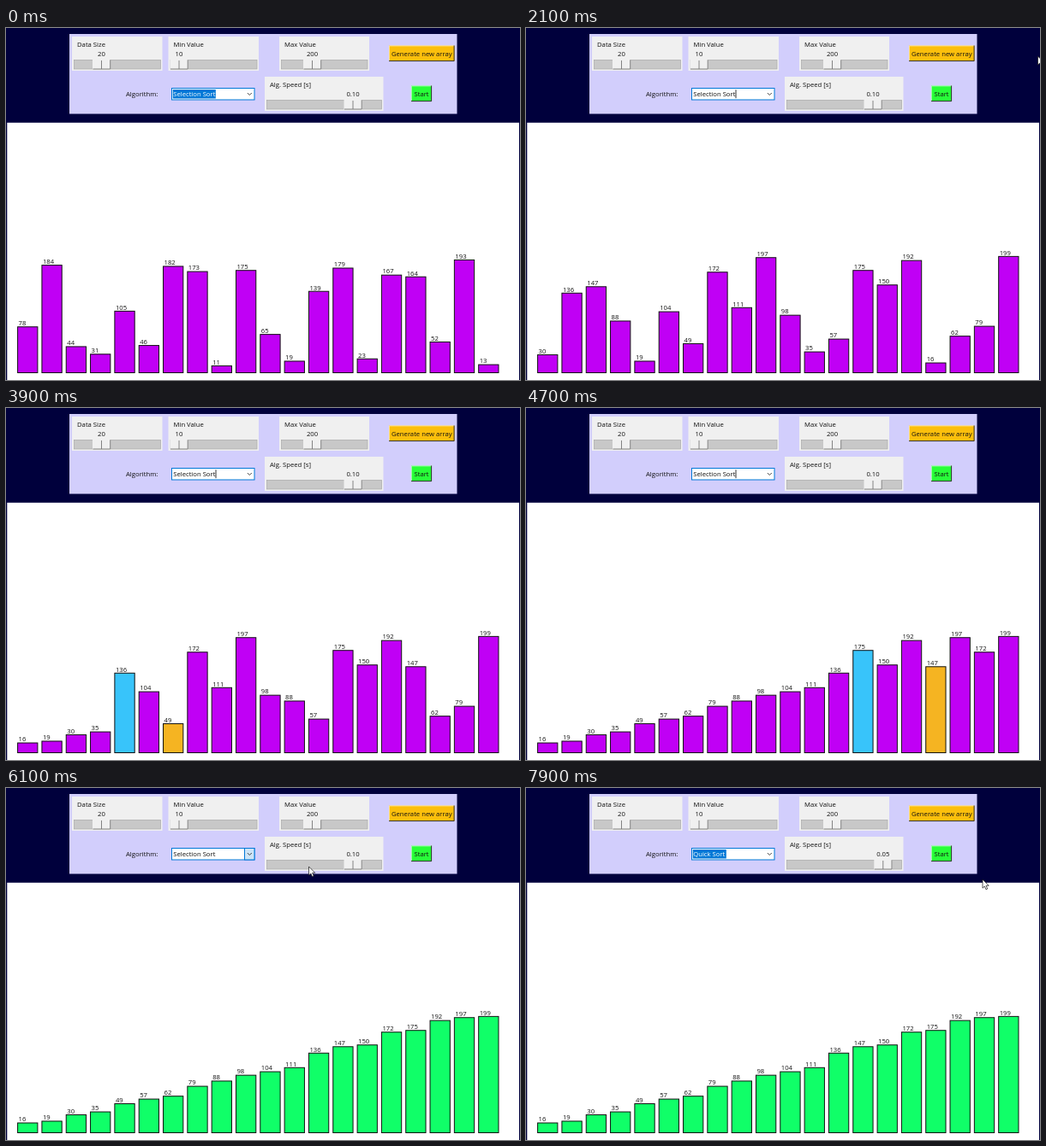
Recreate the animation shown at these times as an HTML page. Size 600 px wide and 412 px high, loop 8000 ms.

```html
<!DOCTYPE html>
<html lang="en">
<head>
<meta charset="utf-8">
<title>Sorting visualizer</title>
<style>
  html, body { margin: 0; width: 100%; height: 100%; overflow: hidden; background: #00003c; }
  svg { display: block; width: 600px; height: 412px; }
  text { font: 7.7px "Open Sans", "Noto Sans", sans-serif; fill: #111; white-space: pre; }
</style>
</head>
<body>
<svg id="stage" viewBox="0 0 600 412"></svg>
<script>
const LOOP = 8000;
const REGENERATE = 1680, SORT_START = 3500, STEP = 89;
const DESELECT = 650, PICK_QUICK = 7320;
const COLORS = { idle: '#c000f5', current: '#38c4fa', minimum: '#f5b422', done: '#10ff68' };
const BLUE = '#0078d7';

const firstData = [78, 184, 44, 31, 105, 46, 182, 173, 11, 175, 65, 19, 139, 179, 23, 167, 164, 52, 193, 13];
const secondData = [30, 136, 147, 88, 19, 104, 49, 172, 111, 197, 98, 35, 57, 175, 150, 192, 16, 62, 79, 199];

// Pointer waypoints [time, x, y]; each list is one visit to the stage.
const visits = [
  [[100, 286, 108], [500, 262, 76], [680, 262, 76], [920, 576, 44], [1130, 576, 42], [1300, 557, 37.5],
   [1520, 500, 30], [1740, 500, 30], [2100, 597.5, 33], [2200, 612, 34]],
  [[2950, 612, 60], [3380, 487, 77], [3520, 487, 77], [3680, 612, 66]],
  [[5500, 540, -16], [5880, 284, 77], [6000, 284, 77], [6100, 353.5, 92], [6300, 405, 90], [6450, 405, 90],
   [6650, 417, 90], [6980, 284, 77], [7120, 284, 77], [7260, 222, 100], [7350, 222, 100],
   [7850, 533, 107], [8000, 533, 107]]
];

const stage = document.getElementById('stage');

function add(tag, attrs, parent = stage) {
  const node = document.createElementNS('http://www.w3.org/2000/svg', tag);
  set(node, attrs);
  parent.appendChild(node);
  return node;
}
function set(node, attrs) {
  for (const key in attrs) node.setAttribute(key, attrs[key]);
}
const box = (x, y, width, height, fill, extra = {}, parent) =>
  add('rect', { x, y, width, height, fill, ...extra }, parent);
function label(x, y, words, anchor = 'start') {
  const node = add('text', { x, y, 'text-anchor': anchor });
  node.textContent = words;
  return node;
}
const show = (node, visible) => set(node, { visibility: visible ? 'visible' : 'hidden' });

function slider(x, y, width, title, value, thumbX) {
  box(x, y, width, 40, '#f0f0f0');
  label(x + 6, y + 11.5, title);
  box(x + 2.5, y + 27.5, width - 4.5, 10.5, '#c8c8c8', { stroke: '#a8a8a8', 'stroke-width': .7 });
  const thumb = add('g', {});
  box(-10.5, y + 27, 21, 11.5, '#f0f0f0', {}, thumb);
  add('path', { d: `M-10 ${y + 38}H10.2V${y + 27.3}M0 ${y + 28}v10`, fill: 'none', stroke: '#777', 'stroke-width': .9 }, thumb);
  const number = label(0, y + 23, value, 'middle');
  const move = (at, words) => {
    set(thumb, { transform: `translate(${at} 0)` });
    set(number, { x: at });
    number.textContent = words;
  };
  move(thumbX, value);
  return move;
}

function button(x, y, width, height, fill, words) {
  box(x, y, width, height, fill);
  add('path', { d: `M${x + .4} ${y + height}V${y + .4}H${x + width}`, fill: 'none', stroke: '#fff', 'stroke-opacity': .7, 'stroke-width': .8 });
  add('path', { d: `M${x} ${y + height - .4}H${x + width - .4}V${y}`, fill: 'none', stroke: '#333', 'stroke-width': 1 });
  label(x + width / 2, y + height / 2 + 2.8, words, 'middle');
}

box(0, 0, 600, 412, '#00003c');
box(74, 7, 452.5, 93.5, '#d2cefc');
slider(77, 10, 105.5, 'Data Size', '20', 111.5);
slider(189.5, 10, 105.5, 'Min Value', '10', 202);
slider(319, 10, 105, 'Max Value', '200', 357.5);
const setSpeed = slider(302, 57, 138.5, 'Alg. Speed [s]', '0.10', 405);
button(447, 20.5, 76.5, 18.5, '#fcbf0c', 'Generate new array');
button(473, 67.5, 24, 18.5, '#28ff38', 'Start');
label(140, 80, 'Algorithm:');

box(193.5, 70.5, 96.5, 13.5, '#fff', { stroke: BLUE, 'stroke-width': 1 });
const arrowHover = box(278.5, 70.5, 11.5, 13.5, '#cce4f7', { stroke: BLUE, 'stroke-width': 1 });
add('path', { d: 'M281.8 76l2.5 2.5 2.5-2.5', fill: 'none', stroke: '#333', 'stroke-width': .9 });
const highlight = box(194.8, 72, 50, 10.5, BLUE);
const choice = label(195.2, 80, 'Selection Sort');
const caret = box(244.6, 72.2, .8, 10, '#000');

box(1.3, 110.8, 597.7, 302, '#fff');
const bars = firstData.map((_, i) => {
  const x = 13.6 + i * 28.32;
  return {
    rect: box(x, 0, 23.3, 0, COLORS.idle, { stroke: '#111', 'stroke-width': 1 }),
    text: label(x + 1, 0, '')
  };
});
const pointer = add('path', {
  d: 'M0 0V10.2L2.3 8 4 11.8 5.7 11 4.1 7.3H7.2Z',
  fill: '#fff', stroke: '#111', 'stroke-width': .7
});

function sortState(step) {
  const data = [...secondData];
  const smallest = from => data.indexOf(Math.min(...data.slice(from)));
  for (let i = 0; i < Math.min(step, data.length); i++) {
    const k = smallest(i);
    [data[i], data[k]] = [data[k], data[i]];
  }
  const done = step >= data.length;
  const minimum = step < 0 || done ? -1 : smallest(step);
  const color = i => done ? COLORS.done : i === step ? COLORS.current
    : i === minimum ? COLORS.minimum : COLORS.idle;
  return { data, color };
}

function drawBars(t) {
  const { data, color } = t < REGENERATE
    ? { data: firstData, color: () => COLORS.idle }
    : sortState(Math.floor((t - SORT_START) / STEP));
  bars.forEach(({ rect, text }, i) => {
    const height = data[i] * .681 + .6;
    set(rect, { y: 403.5 - height, height, fill: color(i) });
    set(text, { y: 401.8 - height });
    text.textContent = data[i];
  });
}

function drawCombo(t) {
  const quick = t >= PICK_QUICK, selected = quick || t < DESELECT;
  const sortEnd = SORT_START + secondData.length * STEP;
  const sorting = t >= SORT_START && t < sortEnd;
  const blinkStart = t < sortEnd ? DESELECT : sortEnd;
  choice.textContent = quick ? 'Quick Sort' : 'Selection Sort';
  choice.style.fill = selected ? '#fff' : '#111';
  set(highlight, { width: quick ? 39 : 50 });
  show(highlight, selected);
  show(caret, !selected && (sorting || (t - blinkStart) % 900 < 600));
  show(arrowHover, (t > 5860 && t < 6150) || (t > 6950 && t < PICK_QUICK));
}

function drawSpeed(t) {
  const progress = Math.max(0, Math.min(1, (t - 6450) / 200));
  const notches = Math.round(progress * 5);
  setSpeed(405 + notches * 2.36, (.1 - notches * .01).toFixed(2));
}

function drawPointer(t) {
  const path = visits.find(p => t >= p[0][0] && t < p[p.length - 1][0]);
  show(pointer, path);
  if (!path) return;
  const next = path.findIndex(p => p[0] > t);
  const [t0, x0, y0] = path[next - 1], [t1, x1, y1] = path[next];
  const u = (t - t0) / (t1 - t0), ease = u * u * (3 - 2 * u);
  set(pointer, { transform: `translate(${x0 + (x1 - x0) * ease} ${y0 + (y1 - y0) * ease})` });
}

const start = performance.now();
function frame() {
  const t = (performance.now() - start) % LOOP;
  drawBars(t);
  drawCombo(t);
  drawSpeed(t);
  drawPointer(t);
  requestAnimationFrame(frame);
}
frame();
</script>
</body>
</html>
```
